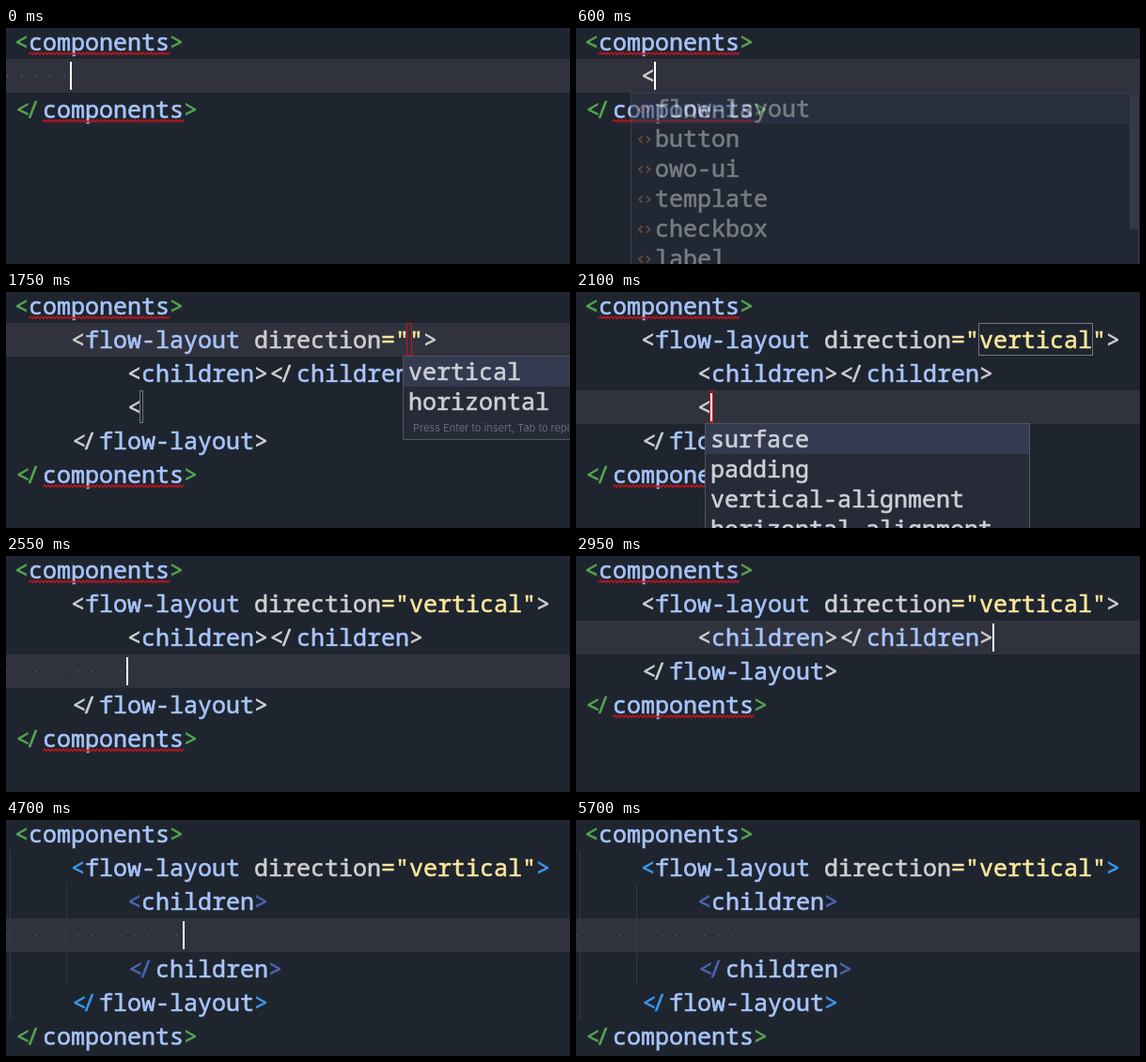
Animation of 600x252 px, one loop 5750 ms. Source, as an HTML page:

```html
<!DOCTYPE html>
<html lang="en">
<head>
<meta charset="utf-8">
<title>Editor completion</title>
<style>
  html, body { margin: 0; width: 100%; height: 100%; overflow: hidden; background: #1f252f; }
  svg { display: block; }
  text { font: 25px "Noto Sans Mono", "DejaVu Sans Mono", monospace; font-variant-ligatures: none; stroke-width: .6px; }
  .hint { font: 11px Inter, "Liberation Sans", sans-serif; stroke: none; }
</style>
</head>
<body>
<svg id="stage" width="600" height="252" viewBox="0 0 600 252"></svg>
<script>
(() => {
const LOOP = 5750, STEP = 50;
const LEFT = 9, CELL = 15, ROW = 36;
const NAME = '#a8c5fb', PLAIN = '#cfcfcf', STRING = '#fbe69a';
const GREEN = '#57a64f', BLUE = '#389af0', INDIGO = '#4a66b5';
const RED = '#c4141c', ORANGE = '#d98a1a', BOX = '#74767c';

// Moments at which the document changes
const OPEN = 100, EXPAND = 1050, ACCEPT = 1800, NEXT = 1900, ERASE = 2550,
  JOIN = 2900, MATCH = 3400, WARN = 3550, SPLIT = 3850, TINT = 3950,
  UNMATCH = 4350, UNWARN = 4400, VALID = 4700, BLINK = 5700;

const stage = document.getElementById('stage');
const spans = [], fades = [];

function make(tag, attrs, parent = stage) {
  const el = document.createElementNS('http://www.w3.org/2000/svg', tag);
  for (const k in attrs) el.setAttribute(k, attrs[k]);
  return parent.appendChild(el);
}

// A group that is visible from one time to another
function during(from, to, build) {
  const g = make('g', {});
  spans.push({ g, from, to });
  build(g);
}

const colX = col => LEFT + col * CELL;
const rowTop = row => row * ROW - 3;

function write(g, x, y, str, fill) {
  make('text', { x, y, fill, stroke: fill }, g).textContent = str;
}
const put = (g, row, col, str, fill) => write(g, colX(col), 24 + row * ROW, str, fill);

function openTag(g, row, col, name, mark) {
  put(g, row, col, '<', mark);
  put(g, row, col + 1, name, NAME);
  put(g, row, col + 1 + name.length, '>', mark);
}

// The two leading characters sit close together like a ligature
function closeTag(g, row, col, name, mark) {
  write(g, colX(col) + 1.5, 24 + row * ROW, '<', mark);
  write(g, colX(col) + 12, 24 + row * ROW, '/', mark);
  put(g, row, col + 2, name, NAME);
  put(g, row, col + 2 + name.length, '>', mark);
}

function wave(g, row, x1, x2, stroke) {
  const y = 98 + (row - 2) * ROW;
  let d = `M${x1} ${y + 2}`;
  for (let x = x1 + 2, up = true; x <= x2; x += 2, up = !up) d += `L${x} ${up ? y : y + 2.5}`;
  make('path', { d, stroke, fill: 'none', 'stroke-width': 1.3 }, g);
}

function rect(g, x, y, width, height, fill) {
  make('rect', { x, y, width, height, fill }, g);
}

function dots(g, row, count) {
  for (let i = 0; i < count; i++) rect(g, 1 + i * CELL, row * ROW + 15, 1.5, 1.5, '#5d5f62');
}

function frame(g, row, x1, x2, stroke) {
  make('rect', { x: x1 + .5, y: rowTop(row) + .5, width: x2 - x1 - 1, height: ROW - 2, fill: 'none', stroke }, g);
}

// Current line
[[1, 0, NEXT], [3, NEXT, JOIN], [2, JOIN, SPLIT], [3, SPLIT, LOOP]].forEach(([row, a, b]) =>
  during(a, b, g => rect(g, 0, rowTop(row), 600, ROW, '#30333e')));

// Indent guides
during(TINT, LOOP, g => {
  rect(g, 4, 33, 1, 180, '#343a45');
  rect(g, 64, 69, 1, 108, '#343a45');
});

// Matching tags
const MATCHED = '#4d5667';
during(MATCH, UNMATCH, g => rect(g, 129, 69, 150, ROW, MATCHED));
during(MATCH, SPLIT, g => rect(g, 279, 69, 165, ROW, MATCHED));
during(SPLIT, UNMATCH, g => rect(g, 129, 141, 165, ROW, MATCHED));

// Trailing whitespace
during(0, OPEN, g => dots(g, 1, 5));
during(ERASE, JOIN, g => dots(g, 3, 9));
during(SPLIT, LOOP, g => dots(g, 3, 13));

// Root element
during(0, LOOP, g => openTag(g, 0, 0, 'components', GREEN));
during(0, VALID, g => wave(g, 0, 24, 174, RED));
[[2, 0, EXPAND], [5, EXPAND, JOIN], [4, JOIN, SPLIT], [6, SPLIT, LOOP]].forEach(([row, a, b]) => {
  during(a, b, g => closeTag(g, row, 0, 'components', GREEN));
  during(a, Math.min(b, VALID), g => wave(g, row, 39, 189, RED));
});

// Layout element
during(OPEN, TINT, g => put(g, 1, 4, '<', PLAIN));
during(TINT, LOOP, g => put(g, 1, 4, '<', BLUE));
during(EXPAND, LOOP, g => {
  put(g, 1, 5, 'flow-layout', NAME);
  put(g, 1, 17, 'direction', PLAIN);
  put(g, 1, 26, '="', STRING);
});
during(EXPAND, ACCEPT, g => {
  put(g, 1, 28, '"', STRING);
  put(g, 1, 29, '>', PLAIN);
});
during(ACCEPT, LOOP, g => put(g, 1, 28, 'vertical"', STRING));
during(ACCEPT, TINT, g => put(g, 1, 37, '>', PLAIN));
during(TINT, LOOP, g => put(g, 1, 37, '>', BLUE));
[[4, EXPAND, JOIN, PLAIN], [3, JOIN, SPLIT, PLAIN], [5, SPLIT, TINT, PLAIN], [5, TINT, LOOP, BLUE]]
  .forEach(([row, a, b, mark]) => during(a, b, g => closeTag(g, row, 4, 'flow-layout', mark)));

// Child element
during(EXPAND, TINT, g => openTag(g, 2, 8, 'children', PLAIN));
during(TINT, LOOP, g => openTag(g, 2, 8, 'children', INDIGO));
during(EXPAND, SPLIT, g => closeTag(g, 2, 18, 'children', PLAIN));
during(SPLIT, TINT, g => closeTag(g, 4, 8, 'children', PLAIN));
during(TINT, LOOP, g => closeTag(g, 4, 8, 'children', INDIGO));
during(EXPAND, ERASE, g => put(g, 3, 8, '<', PLAIN));

// Empty element warning
during(WARN, SPLIT, g => wave(g, 2, 129, 444, ORANGE));
during(SPLIT, UNWARN, g => {
  wave(g, 2, 129, 279, ORANGE);
  wave(g, 3, 0, 189, ORANGE);
  wave(g, 4, 0, 294, ORANGE);
});

// Template fields
during(EXPAND, ACCEPT, g => frame(g, 1, 426, 432, RED));
during(ACCEPT, NEXT, g => frame(g, 1, 428, 550, RED));
during(NEXT, ERASE, g => frame(g, 1, 428, 550, BOX));
during(EXPAND, NEXT, g => frame(g, 3, 142, 146, BOX));
during(NEXT, ERASE, g => frame(g, 3, 142, 146, RED));

// Caret: column, row, from, to
[
  [4, 1, 0, OPEN], [5, 1, OPEN, EXPAND], [28, 1, EXPAND, 1650], [36, 1, ACCEPT, NEXT],
  [9, 3, NEXT, ERASE], [8, 3, ERASE, JOIN], [29, 2, JOIN, 3200], [28, 2, 3200, 3250],
  [20, 2, 3250, 3300], [18, 2, 3300, SPLIT], [12, 3, SPLIT, BLINK]
].forEach(([col, row, a, b]) => during(a, b, g => rect(g, colX(col) - 1, row * ROW, 2, 30, '#fff')));

// Completion list with an opacity table of [time, value]
function popup(x, y, width, height, textX, items, keys, extra) {
  const g = make('g', {});
  make('rect', { x: x + .5, y: y + .5, width: width - 1, height: height - 1, fill: '#262b37', stroke: '#50545e' }, g);
  rect(g, x + 1, y + 1, width - 2, 32, '#343a50');
  items.forEach((item, i) => write(g, textX, y + 26 + i * 32, item, '#cdd0d6'));
  if (extra) extra(g);
  fades.push({ g, keys });
}

popup(58, 69, 541, 200, 84, ['flow-layout', 'button', 'owo-ui', 'template', 'checkbox', 'label'],
  [[500, 0], [700, 1], [1050, 1], [1100, .94], [1250, 0]], g => {
    for (let i = 0; i < 6; i++) {
      const y = 87 + i * 32;
      make('path', {
        d: `M70.5 ${y - 3.5}l-3.5 3.5l3.5 3.5M75 ${y - 3.5}l3.5 3.5l-3.5 3.5`,
        fill: 'none', stroke: '#c9764f', 'stroke-width': 1.5
      }, g);
    }
    rect(g, 589, 71, 9, 144, '#4b4e58');
  });

popup(422, 68, 300, 90, 428, ['vertical', 'horizontal'],
  [[1200, 0], [1350, 1], [1800, 1], [1950, 0]], g => {
    make('text', { x: 433, y: 149, fill: '#656b78', class: 'hint' }, g)
      .textContent = 'Press Enter to insert, Tab to replace';
  });

popup(137, 140, 346, 180, 143, ['surface', 'padding', 'vertical-alignment', 'horizontal-alignment'],
  [[1900, 0], [2100, 1], [2300, 1], [2500, 0]]);

function level(keys, t) {
  if (t <= keys[0][0]) return keys[0][1];
  for (let i = 1; i < keys.length; i++) {
    const [a, va] = keys[i - 1], [b, vb] = keys[i];
    if (t <= b) return va + (vb - va) * (t - a) / (b - a);
  }
  return keys[keys.length - 1][1];
}

const start = performance.now();
function draw() {
  const now = Math.max(0, performance.now() - start) % LOOP;
  const t = Math.floor(now / STEP) * STEP;
  for (const { g, from, to } of spans) g.style.display = t >= from && t < to ? '' : 'none';
  for (const { g, keys } of fades) {
    const o = level(keys, t);
    g.style.display = o > 0 ? '' : 'none';
    g.style.opacity = o;
  }
  requestAnimationFrame(draw);
}
draw();
})();
</script>
</body>
</html>
```
